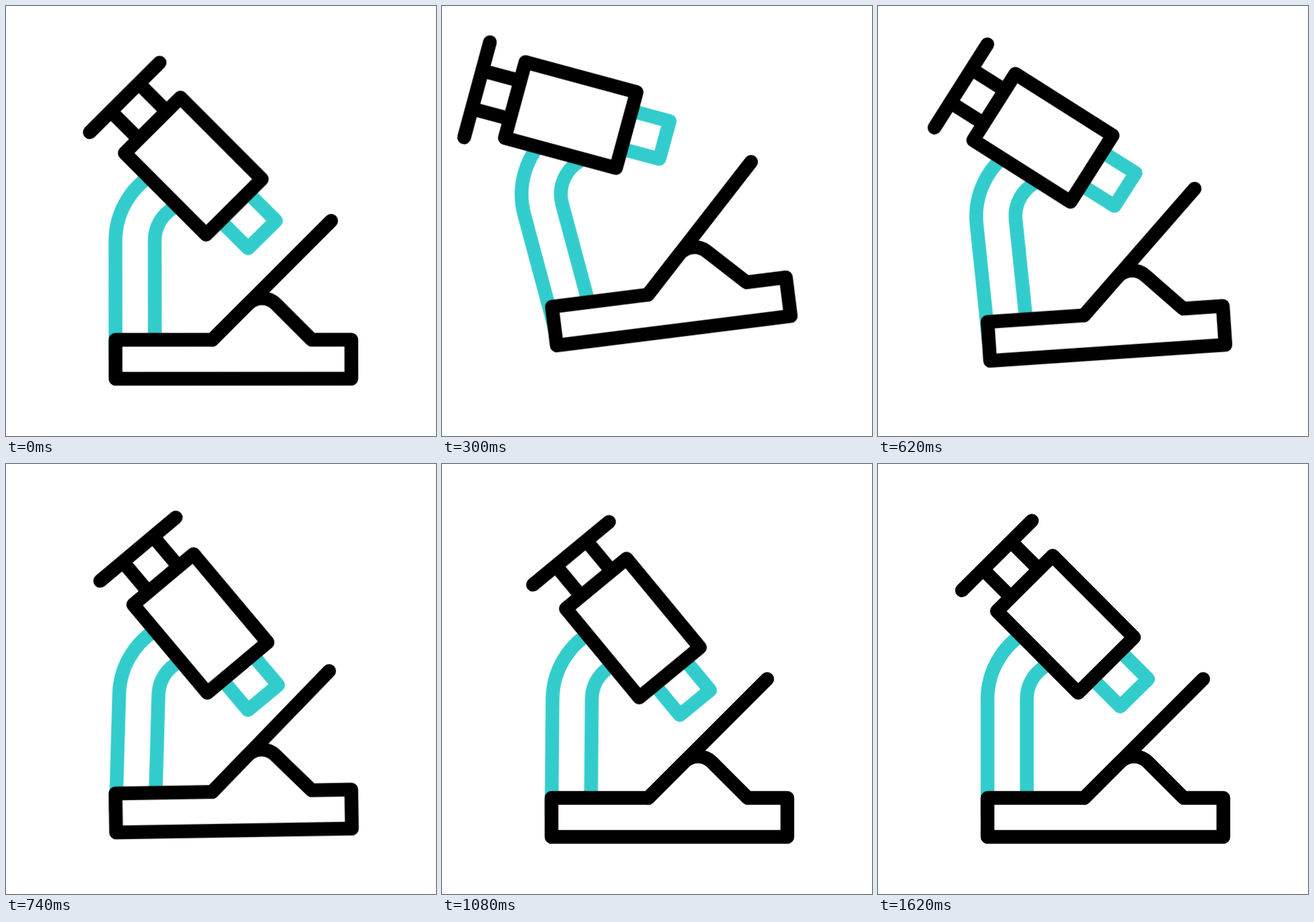
Recreate the animation shown at these times as an HTML page without scripts. Size 640 by 640 pixels, loop 1.7 s.

```html
<!DOCTYPE html>
<html lang="en">
<head>
<meta charset="utf-8">
<title>Microscope</title>
<style>
  html, body { margin: 0; width: 100%; height: 100%; overflow: hidden; background: #fff; }
  svg { display: block; width: 100%; height: 100%; }

  path { fill: none; stroke: #000; stroke-width: 20.5; stroke-linejoin: round; }
  .solid { fill: #fff; }
  .round { stroke-linecap: round; }
  .teal { stroke: #3cc; }

  .scope, .arm, .head { animation: 1700ms linear infinite; }
  .scope { transform-origin: 338.5px 526px; animation-name: lift; }
  .arm { transform-origin: 192px 526px; animation-name: sway; }
  .head { transform-origin: 222px 273px; animation-name: nod; }

  /* whole microscope hops up and tilts back */
  @keyframes lift {
    0%, 45.88%, 100% { transform: translate(0, 0) rotate(0deg); }
    23.24% { transform: translate(3.7px, -93.8px) rotate(-9.4deg); }
  }
  /* arm swings on the base */
  @keyframes sway {
    0%, 95.29%, 100% { transform: rotate(0deg); }
    11.76% { transform: rotate(-5.4deg); }
    23.24% { transform: rotate(-10.1deg); }
    25.88% { transform: rotate(-9.1deg); }
    36.47% { transform: rotate(-2.1deg); }
    47.24% { transform: rotate(5deg); }
    75.88% { transform: rotate(-2.9deg); }
  }
  /* tube follows the arm slightly late */
  @keyframes nod {
    0%, 1.76%, 95.29%, 100% { transform: rotate(0deg); }
    11.76% { transform: rotate(-9.4deg); }
    25.59% { transform: rotate(-22.4deg); }
    36.47% { transform: rotate(-6.9deg); }
    50.59% { transform: rotate(13.2deg); }
    75.88% { transform: rotate(-3.1deg); }
  }
</style>
</head>
<body>
<svg viewBox="0 0 640 640">
  <g class="scope">
    <g class="arm">
      <path class="teal" d="M163 526V350A116 116 0 0 1 230 244.9M221.5 526V350A57.5 57.5 0 0 1 279 292.5"/>
      <g class="head">
        <path class="teal" d="M361 279L402 320L360.5 361L320 320.5"/>
        <path d="M198 115.5L239.5 157M156.5 157L198 198.5"/>
        <path class="round" d="M125 188L229 84.5"/>
        <path class="solid" d="M260 136.5L381 258L298 340.5L177 219Z"/>
      </g>
    </g>
    <path class="solid" d="M163 497H307L360 444A29.7 29.7 0 0 1 402 444L455 497H514V555H163Z"/>
    <path class="round" d="M307 497L484 320"/>
  </g>
</svg>
</body>
</html>
```
